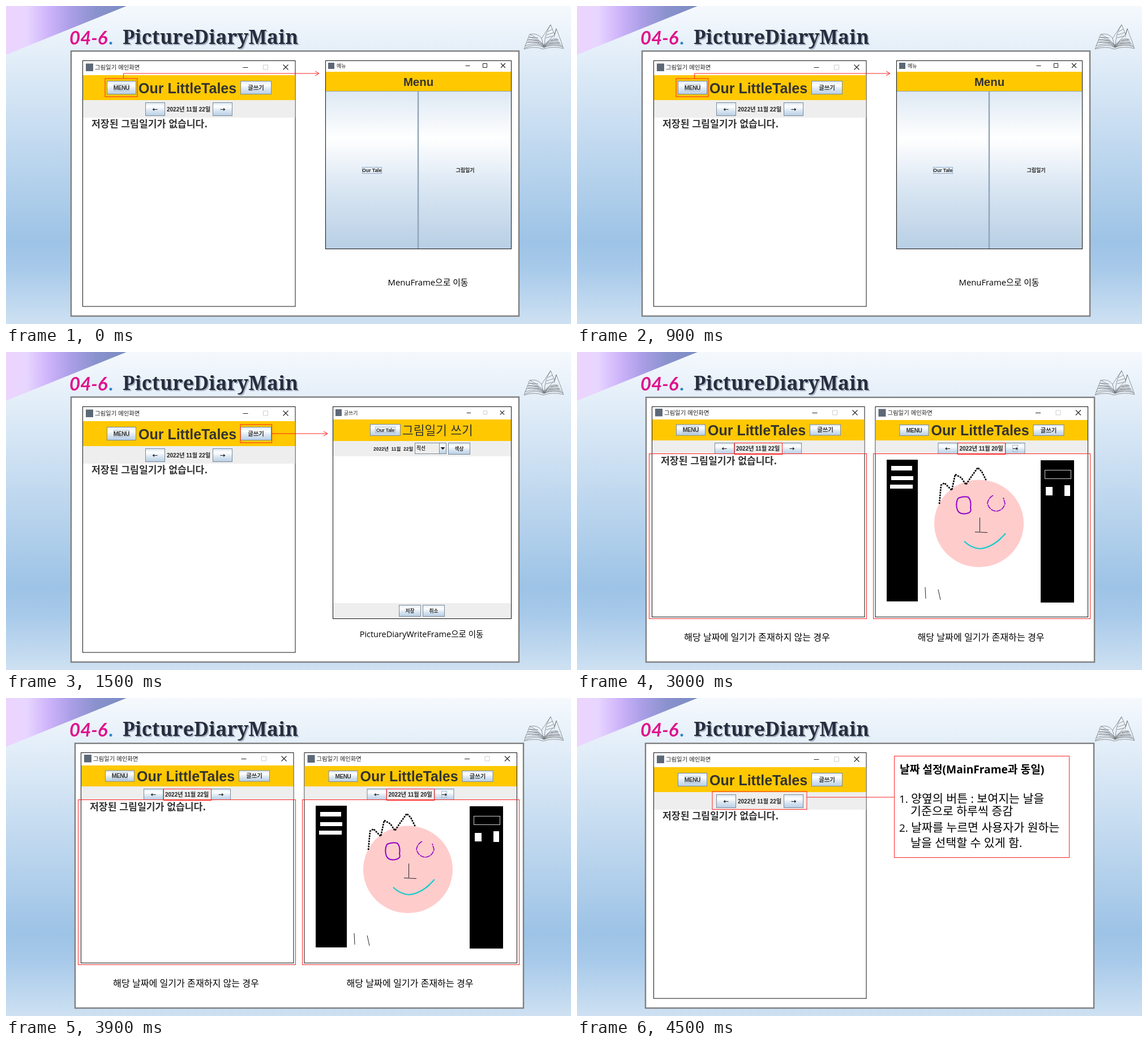
Animation of 998x561 px, one loop 6000 ms. Source, as an HTML page:

```html
<!DOCTYPE html>
<html lang="ko">
<head>
<meta charset="utf-8">
<title>PictureDiaryMain</title>
<style>
html, body { margin: 0; width: 100%; height: 100%; overflow: hidden; }
svg { display: block; width: 100vw; height: 100vh; }
text { white-space: pre; }
.ui { font-family: "Liberation Sans", "Noto Sans CJK KR", "Noto Sans CJK JP", sans-serif; }
.ko { font-family: "Noto Sans CJK KR", "Noto Sans CJK JP", sans-serif; }
.note { font-family: "Open Sans", "Noto Sans CJK KR", "Noto Sans CJK JP", sans-serif; }
.b { font-weight: 700; }
.mid { text-anchor: middle; }
</style>
</head>
<body>
<svg id="stage" viewBox="0 0 998 561" preserveAspectRatio="none">
  <defs>
    <linearGradient id="sky" x2="0" y2="1">
      <stop offset="0" stop-color="#f5f9fd"/>
      <stop offset=".74" stop-color="#9dc3e6"/>
      <stop offset=".83" stop-color="#a8caea"/>
      <stop offset="1" stop-color="#cee1f2"/>
    </linearGradient>
    <linearGradient id="corner" gradientUnits="userSpaceOnUse" x2="212">
      <stop offset="0" stop-color="#ecd4fe"/>
      <stop offset=".17" stop-color="#e8d6ff"/>
      <stop offset=".36" stop-color="#cdb3fa"/>
      <stop offset=".55" stop-color="#a99ee6"/>
      <stop offset=".75" stop-color="#8a92cd"/>
      <stop offset="1" stop-color="#7b8cc3"/>
    </linearGradient>
    <linearGradient id="metal" x2="0" y2="1">
      <stop offset="0" stop-color="#dde8f3"/>
      <stop offset=".3" stop-color="#fff"/>
      <stop offset=".6" stop-color="#dbe7f3"/>
      <stop offset="1" stop-color="#b8cfe5"/>
    </linearGradient>
  </defs>
</svg>
<script>
const stage = document.getElementById('stage');
const RED = '#f22', AMBER = '#ffc800', APP = 'Our LittleTales', HOME = 'Our Tale';

const text = (x, y, s, size, cls = 'ui', fill = '#222', extra = '') =>
  `<text x="${x}" y="${y}" font-size="${size}" class="${cls}" fill="${fill}" ${extra}>${s}</text>`;
const fillBox = (x1, y1, x2, y2, fill) =>
  `<rect x="${x1}" y="${y1}" width="${x2 - x1}" height="${y2 - y1}" fill="${fill}"/>`;
const outline = (x1, y1, x2, y2, stroke, fill = 'none', w = 1) =>
  `<rect x="${x1 + .5}" y="${y1 + .5}" width="${x2 - x1 - 1}" height="${y2 - y1 - 1}" fill="${fill}" stroke="${stroke}" stroke-width="${w}"/>`;
const path = (d, stroke, w = 1, extra = '') =>
  `<path d="${d}" fill="none" stroke="${stroke}" stroke-width="${w}" ${extra}/>`;
const redBox = (...edges) => outline(...edges, RED);
const panel = (x1, x2, y1) =>
  `<rect x="${x1}" y="${y1}" width="${x2 - x1}" height="${547 - y1}" fill="#fff" stroke="#7f7f7f" stroke-width="2.4"/>`;

function button(x1, y1, x2, y2, label, size, focus = 0) {
  const cx = (x1 + x2) / 2, cy = (y1 + y2) / 2;
  const ring = focus ? outline(cx - focus, cy - size * .62, cx + focus, cy + size * .62, '#a3b8cc') : '';
  return outline(x1, y1, x2, y2, '#7a8a99', 'url(#metal)') + ring +
    text(cx, cy + size * .37, label, size, 'ui b mid', '#333', /[A-Z]/.test(label) ? 'letter-spacing="-.4"' : '');
}

// Small arrow button; dir is -1 for left and 1 for right
function stepButton(x, y, h, dir, focused) {
  const cx = x + 17.5, tip = cx + 4 * dir;
  return outline(x, y - h, x + 35, y + h, '#7a8a99', 'url(#metal)') +
    (focused ? outline(cx - 5, y - 6, cx + 5, y + 6, '#a3b8cc') : '') +
    path(`M${cx - 4 * dir} ${y + .5}H${tip}m${-2.5 * dir} -2l${2.5 * dir} 2l${-2.5 * dir} 2`, '#222', 1.1);
}

// Minimise, maximise and close marks, placed by their centres
function controls(xs, y, r, maxColour) {
  const [a, b, c] = xs;
  return path(`M${a - r} ${y + .5}h${2 * r}`, '#222') +
    path(`M${b - r + .5} ${y - r + .5}h${2 * r - 1}v${2 * r - 1}h${1 - 2 * r}z`, maxColour) +
    path(`M${c - r} ${y - r}l${2 * r} ${2 * r}m0 ${-2 * r}l${-2 * r} ${2 * r}`, '#222', 1.1);
}

// rows: bottoms of the title bar, banner, date strip and window
function mainWindow(x, rows, o = {}) {
  const [bar, banner, strip, bottom] = rows;
  const tight = bottom < 500;
  const ty = (96 + bar) / 2 - .5, by = (bar + banner) / 2, bh = tight ? 10 : 12;
  const dy = tight ? 170 : 182;
  return outline(x, 96, x + 376.5, bottom, '#111', '#fff') +
    fillBox(x + 6, ty - 7, x + 19, ty + 6.5, '#5d6877') +
    text(x + 22, ty + 3.5, '그림일기 메인화면', 10.4, 'ko') +
    controls([x + 288, x + 323.5, x + 359], Math.round(ty - .5), 4.5, '#ccc') +
    fillBox(x + 1, bar, x + 375.5, banner, AMBER) +
    fillBox(x + 1, banner, x + 375.5, strip, '#eee') +
    button(x + 43, by - bh, x + 95, by + bh, 'MENU', 10, o.next ? 0 : 14) +
    text(x + 99, by + (tight ? 9 : 10), APP, 25, 'ui b', '#333') +
    button(x + 279, by - bh, x + 334, by + bh, '글쓰기', 10.4) +
    stepButton(x + 111, dy, bh, -1) +
    text(x + 149, dy + 4, o.date || '2022년 11월 22일', 10, 'ui b') +
    stepButton(x + 230, dy, bh, 1, o.next) +
    (o.next ? '' : text(x + 16, tight ? 198 : 214, '저장된 그림일기가 없습니다.', 17.2, 'ko b', '#333'));
}
const tall = () => mainWindow(135, [122, 166, 197, 530.5]);

function menuWindow() {
  return outline(564, 96, 893, 429, '#111', '#fff') +
    fillBox(569, 100, 580, 111, '#5d6877') + text(584, 108.5, '메뉴', 9, 'ko') +
    controls([815.5, 846, 878], 105, 4, '#222') +
    fillBox(565, 116, 892, 150, AMBER) + text(728.5, 140.5, 'Menu', 20.4, 'ui b mid', '#333') +
    fillBox(565, 150, 892, 428, 'url(#metal)') + path('M565 150.5H892', '#8fa5ba') +
    path('M728 150V428', '#8fa5ba', 2.4) +
    outline(629, 284, 664, 296, '#8fa9c4') +
    text(646.3, 293, HOME, 8.5, 'ui b mid') + text(811, 293, '그림일기', 9, 'ko b mid');
}

function writeWindow() {
  return outline(577, 96, 893, 471, '#111', '#fff') +
    fillBox(582, 101, 593, 113, '#5d6877') + text(597, 110.5, '글쓰기', 8.8, 'ko') +
    controls([817.5, 846.5, 876.5], 107, 3.7, '#ccc') +
    fillBox(578, 119, 892, 157, AMBER) + fillBox(578, 157, 892, 184, '#eee') +
    fillBox(578, 443, 892, 470, '#eee') +
    button(643, 127, 697, 148, HOME, 8.8, 18) +
    text(700, 146, '그림일기 쓰기', 21.5, 'ko', '#333') +
    text(649, 174, '2022년  11월  22일', 8.5, 'ui b') +
    outline(722, 160, 778, 180, '#7a8a99', '#eee') + text(725, 173, '직선', 8.6, 'ko b', '#333') +
    outline(765, 160, 778, 180, '#7a8a99', 'url(#metal)') +
    '<path d="M767.5 168h8l-4 4.5z" fill="#222"/>' +
    button(781, 160, 820, 181, '색상', 8.7) +
    button(694, 446, 733, 467, '저장', 8.7) + button(736, 446, 775, 467, '취소', 8.7);
}

function drawing() {
  const white = [[555, 201, 592, 209], [555, 219, 594, 226], [553, 234, 593, 241],
    [828, 238, 840, 253], [861, 235, 871, 254]];
  return fillBox(547, 190, 602, 440, '#000') + fillBox(819, 191, 878, 442, '#000') +
    white.map(w => fillBox(...w, '#fff')).join('') + outline(826, 208, 873, 224, '#ccc') +
    '<ellipse cx="710" cy="302.5" rx="79" ry="77" fill="#fcc"/>' +
    path('M640 268L643 235L649 231L662 244L668 216L679 222L687 234L695 222L708 204L715 211L723 227',
      '#000', 2.6, 'stroke-dasharray="3 1.6"') +
    path('M673 258Q682 254 691 256Q697 262 695 275Q698 283 688 285Q676 287 672 279Q668 267 673 258', '#9200c8', 2) +
    path('M735 253Q727 257 725 267Q728 279 740 281Q753 280 756 267L753 257', '#9200c8', 1.6, 'stroke-dasharray="9 1"') +
    path('M711.5 292V317M703 317.5L725 318.5', '#222') +
    path('M684 334Q696 346 712 347Q735 345 757 320', '#1cc', 2) +
    path('M722 345Q739 339 748 330', '#1cc', 1.4) +
    path('M615 415L616 435M638 419L642 437', '#222');
}

const arrow = d => path(d + 'm-7 -4l7 4l-7 4', RED);
const caption = (x, y, s, size) => text(x, y, s, size, 'note mid', '#000');

const scenes = [
  panel(115, 906, 79.5) + tall() + menuWindow() +
    redBox(174.5, 127.5, 232.5, 160.5) + arrow('M207.5 128V119H553') +
    caption(745.5, 493, 'MenuFrame으로 이동', 14.8),

  panel(115, 906, 79.5) + tall() + writeWindow() +
    redBox(413.5, 127.5, 470, 160.5) + arrow('M470 144H568') +
    caption(734, 503, 'PictureDiaryWriteFrame으로 이동', 14.5),

  panel(122, 914, 80) + mainWindow(132, [119, 156, 180, 468]) +
    mainWindow(526.5, [120, 156, 180, 468], { date: '2022년 11월 20일', next: true }) + drawing() +
    redBox(278, 160, 363, 181) + redBox(127, 179, 512, 471) +
    redBox(672, 160, 757, 181) + redBox(523, 179, 907, 471) +
    caption(318, 509, '해당 날짜에 일기가 존재하지 않는 경우', 16.1) +
    caption(713.5, 509, '해당 날짜에 일기가 존재하는 경우', 16.1),

  panel(121, 913, 80) + tall() + redBox(238.5, 164.5, 406.5, 197) + path('M406 175H560', RED) +
    redBox(560, 102, 870, 282) +
    text(570, 133, '날짜 설정(MainFrame과 동일)', 19.2, 'note b', '#000') +
    [[569, 185, '1.'], [590, 185, '양옆의 버튼 : 보여지는 날을'], [589, 207, '기준으로 하루씩 증감'],
      [569, 236, '2.'], [590, 236, '날짜를 누르면 사용자가 원하는'], [589, 263, '날을 선택할 수 있게 함.']]
      .map(([x, y, s]) => text(x, y, s, s.length < 3 ? 19 : 20.6, 'note', '#000')).join('')
];

function book() {
  let d = 'M950 73Q935 65 916 74L915 76Q934 70 949 76Q966 70 985 75L983 72Q967 66 950 73';
  for (let i = 0; i < 5; i++) {
    d += `M950 ${73 - i}Q${940 - i} ${62 - i * 2} ${917 + i * 2} ${70 - i * 5}`;
    d += `M950 ${73 - i}Q${966 - i} ${64 - i * 2} ${982 - i * 2} ${70 - i * 3}`;
  }
  d += 'M925 50L916 73M925 50Q939 47 946 57L950 73M946 57L962 33L969 50L972 40L980 61L984 73';
  d += 'M962 33Q951 49 951 73M969 50Q958 60 951 73M972 40L968 55M957 45L965 41M955 51L967 47M954 56L966 53';
  d += 'M925 55L940 56M923 59L941 61M922 63L942 65M959 66L978 65M962 61L976 59';
  return path(d, '#555', .6);
}

const title = (dx, dy, fill) => text(206 + dx, 67 + dy, 'PictureDiaryMain', 34.2, 'b', fill,
  'font-family="Noto Serif, DejaVu Serif, serif"');
const chapter = 'font-family="Lato, sans-serif" font-style="italic"';

stage.insertAdjacentHTML('beforeend',
  fillBox(0, 0, 998, 561, 'url(#sky)') + '<path d="M0 0H213L0 86z" fill="url(#corner)"/>' +
  text(112, 68, '04-6', 33, 'b', '#e0128c', chapter) + text(182, 68, '.', 33, 'b', '#2b83c6', chapter) +
  title(2, 2, '#a9b4c6') + title(0, 0, '#262d3d') + book() +
  scenes.map(s => `<g class="scene" display="none">${s}</g>`).join(''));

const layers = [...stage.querySelectorAll('.scene')];
const start = performance.now();

function draw(now) {
  const current = Math.floor(Math.max(0, now - start) % 6000 / 1500);
  layers.forEach((layer, i) => layer.setAttribute('display', i === current ? 'inline' : 'none'));
  requestAnimationFrame(draw);
}
draw(start);
</script>
</body>
</html>
```
